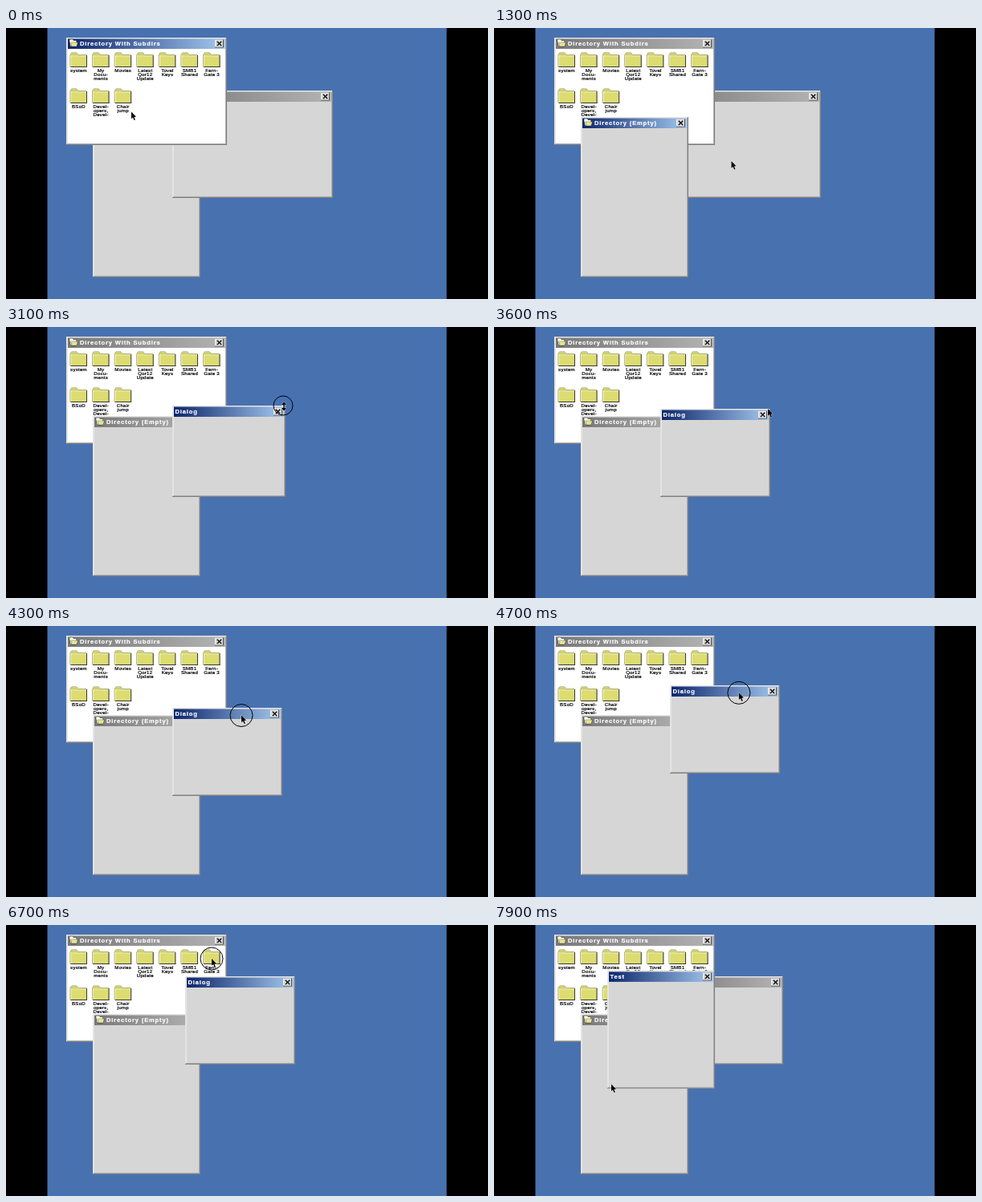
Recreate the animation shown at these times as an HTML page with a canvas. Size 600x338 px, loop 8000 ms.

```html
<!DOCTYPE html>
<html lang="en">
<head>
<meta charset="utf-8">
<title>Desktop windows</title>
<style>
html, body { margin: 0; height: 100%; overflow: hidden; background: #000; }
canvas { display: block; }
</style>
</head>
<body>
<canvas id="stage" width="600" height="338"></canvas>
<script>
const ctx = document.getElementById('stage').getContext('2d');
const LOOP = 8000, STEP = 100, UNIT = 33, CLICK = 200;

const folders = ['system', 'My|Docu-|ments', 'Movies', 'Latest|Qor12|Update', 'Tovel|Keys',
  'SMB1|Shared', 'Fern-|Gate 3', 'BSoD', 'Devel-|opers,|Devel-', 'Chair|jump'];

// Pointer gestures; a click follows its move, a drag holds the button during it.
const gestures = [
  { start: 100, end: 300, x: 165, y: 168, click: true },
  { start: 600, end: 900, x: 180, y: 40 },
  { start: 900, end: 1300, x: 295.5, y: 166 },
  { start: 1400, end: 1500, x: 295.5, y: 166, click: true },
  { start: 1700, end: 2300, x: 404, y: 78 },
  { start: 2600, end: 3100, x: 345, y: 98, drag: true },
  { start: 3100, end: 3400, x: 341, y: 102, drag: true },
  { start: 3600, end: 4200, x: 293, y: 111.5 },
  { start: 4300, end: 4900, x: 309, y: 73.5, drag: true },
  { start: 5100, end: 5500, x: 336.5, y: 74.5 },
  { start: 6000, end: 6700, x: 256, y: 42, click: true },
  { start: 7000, end: 7900, x: 146, y: 198.5 }
];

function pointerAt(t) {
  let x = 156, y = 104.5, pressed = false;
  for (const g of gestures) {
    if (t < g.start) break;
    const u = Math.min(1, (t - g.start) / (g.end - g.start)), k = u * u * (3 - 2 * u);
    x += (g.x - x) * k;
    y += (g.y - y) * k;
    pressed = g.click ? t >= g.end && t < g.end + CLICK : g.drag && t > g.start - STEP && t < g.end;
  }
  return { x, y, pressed };
}

function rect(x, y, w, h, color) {
  ctx.fillStyle = color;
  ctx.fillRect(x, y, w, h);
}

function poly(points, fill, stroke, width = 1) {
  ctx.beginPath();
  for (let i = 0; i < points.length; i += 2) ctx.lineTo(points[i], points[i + 1]);
  ctx.closePath();
  if (stroke) {
    ctx.strokeStyle = stroke;
    ctx.lineWidth = width;
    ctx.stroke();
  }
  ctx.fillStyle = fill;
  ctx.fill();
}

function text(string, x, y, color) {
  ctx.fillStyle = ctx.strokeStyle = color;
  ctx.lineWidth = .22;
  ctx.fillText(string, x, y);
  ctx.strokeText(string, x, y);
}

function bevel(x, y, w, h, face, light, dark) {
  rect(x, y, w, h, dark);
  rect(x, y, w - 1, h - 1, light);
  rect(x + 1, y + 1, w - 2, h - 2, face);
}

function at(x, y, angle, draw) {
  ctx.save();
  ctx.translate(x, y);
  ctx.rotate(angle);
  draw();
  ctx.restore();
}

function folder() {
  poly([0, 4, 1.5, 1, 8, 1, 9.5, 3.5, 20, 3.5, 20, 18, 0, 18], '#d0d06c', '#85856a', .9);
  rect(.6, 4.6, 19, 1, '#f6f6d8');
  rect(.6, 4.6, 1, 13, '#f6f6d8');
  rect(1.6, 5.6, 18, 12, '#dcdc70');
  rect(20, 4, 1, 15, '#3c3c30');
  rect(.5, 18, 20.5, 1, '#3c3c30');
}

function titleIcon() {
  poly([0, 1, 1, 0, 4, 0, 5, 1.5, 8.5, 1.5, 8.5, 8.5, 1.5, 8.5], '#f8f8e0', '#222', .9);
  poly([2, 4, 10.3, 4, 8.8, 8.5, 3, 8.5], '#e4e494', '#222', .7);
}

function drawFolders() {
  ctx.font = '6.1px "Liberation Sans", Arial, sans-serif';
  ctx.letterSpacing = '0.25px';
  ctx.textAlign = 'center';
  folders.forEach((name, i) => {
    const x = 90.5 + i % 7 * 27.6, y = 30 + Math.floor(i / 7) * 45;
    at(x - 10.5, y, 0, folder);
    name.split('|').forEach((line, row) => text(line, x, y + 25.2 + row * 5.1, '#000'));
  });
}

function drawWindow({ x, y, w, h, title, icon, listing }, active) {
  const right = x + w;
  bevel(x, y, w, h, '#d6d6d6', '#e4e4e4', '#808080');
  bevel(x + 1, y + 1, w - 2, h - 2, '#d6d6d6', '#e4e4e4', '#a8a8a8');
  if (listing) rect(x + 2, y + 14, w - 4, h - 16, '#fff');

  const bar = ctx.createLinearGradient(x, 0, right, 0);
  bar.addColorStop(0, active ? '#0a246a' : '#787878');
  bar.addColorStop(1, active ? '#a6caf0' : '#b4b4b4');
  rect(x + 2, y + 1.5, w - 4, 12.5, bar);

  if (icon) at(x + 4, y + 2.3, 0, titleIcon);
  ctx.font = 'bold 7.5px "Liberation Sans", Arial, sans-serif';
  ctx.letterSpacing = '0.88px';
  ctx.textAlign = 'left';
  text(title, x + (icon ? 17 : 3.5), y + 10.2, '#fff');

  bevel(right - 15, y + 2.5, 11, 10, '#d6d6d6', '#f4f4f4', '#505050');
  for (const angle of [45, -45]) {
    at(right - 9.5, y + 7.4, angle * Math.PI / 180, () => rect(-3.8, -.65, 7.6, 1.3, '#000'));
  }
  if (listing) drawFolders();
}

function drawPointer(t) {
  const { x, y, pressed } = pointerAt(t);
  const resizing = t >= 2200 && t < 3600;
  if (pressed) {
    ctx.strokeStyle = '#000';
    ctx.lineWidth = 1;
    ctx.beginPath();
    ctx.arc(x, y, resizing ? 12 : 14, 0, Math.PI * 2);
    ctx.stroke();
  }
  if (resizing) {
    at(x + 1, y + 1, t < 3000 ? Math.PI / 4 : 0, () =>
      poly([0, -5.5, 3, -2, .7, -2, .7, 2, 3, 2, 0, 5.5, -3, 2, -.7, 2, -.7, -2, -3, -2], '#000', '#fff', .7));
  } else {
    at(x, y, 0, () =>
      poly([0, 0, 0, 8.7, 2, 7, 3.5, 10.6, 4.9, 10, 3.4, 6.4, 6, 6.2], '#000', '#fff', .6));
  }
}

// Places a window on the layout grid.
function place(col, row, cols, rows, title, options) {
  return { x: 75 + col * UNIT, y: 12 + row * UNIT, w: cols * UNIT + 2, h: rows * UNIT + 2, title, ...options };
}

const listing = place(0, 0, 6, 4, 'Directory With Subdirs', { icon: true, listing: true });
const empty = place(1, 3, 4, 6, 'Directory (Empty)', { icon: true });
const test = place(2, 1.36, 4, 4.4, 'Test');

function dragged(t, from, to) {
  const a = pointerAt(from), b = pointerAt(Math.max(from, Math.min(t, to)));
  return [Math.round(b.x - a.x), Math.round(b.y - a.y)];
}

function dialogAt(t) {
  const dialog = place(4, 2, 6, 4, 'Dialog');
  const [growX, growY] = dragged(t, 2600, 3400), [moveX, moveY] = dragged(t, 4300, 4900);
  dialog.w += growX;
  dialog.h -= growY;
  dialog.x += moveX;
  dialog.y += growY + moveY;
  return dialog;
}

function stackAt(t) {
  const dialog = dialogAt(t);
  if (t < 400) return [empty, dialog, listing];
  if (t < 1600) return [dialog, listing, empty];
  if (t < 6900) return [listing, empty, dialog];
  return [listing, empty, dialog, test];
}

function render(now) {
  const t = Math.floor(now % LOOP / STEP) * STEP;
  rect(0, 0, 600, 338, '#000');
  rect(51.5, 0, 497, 338, '#4871b0');
  stackAt(t).forEach((win, i, stack) => drawWindow(win, i === stack.length - 1));
  drawPointer(t);
}

const start = performance.now();
function frame() {
  render(performance.now() - start);
  requestAnimationFrame(frame);
}
frame();
</script>
</body>
</html>
```
